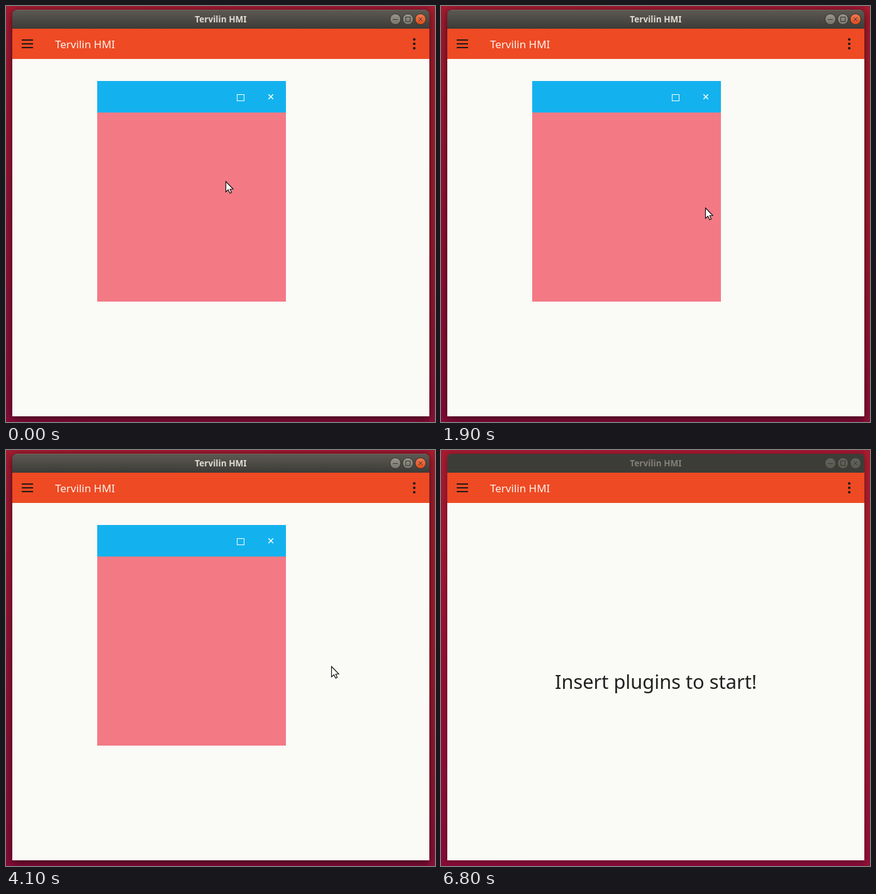
These frames come from a looping animation (682x660 px, 6900 ms). An HTML page with a canvas:

```html
<!DOCTYPE html>
<html lang="en">
<head>
<meta charset="utf-8">
<title>Context menu demo</title>
<style>
  html, body { margin: 0; width: 100%; height: 100%; overflow: hidden; background: #8a1030; }
  canvas { display: block; }
</style>
</head>
<body>
<canvas id="stage" width="682" height="660"></canvas>
<script>
const ctx = document.getElementById('stage').getContext('2d');
const LOOP = 6900, STEP = 100;
const APP_NAME = 'Tervilin HMI';
const BLUE = '#13b2ee', PINK = '#f37a85', ORANGE = '#ee4a24', PAPER = '#fafaf6';
const INK = '#212121', ICON = '#1f1a18';

// Pointer glides; it rests in between
const HOME = { x: 349, y: 278 };
const GLIDES = [
  { from: 0, to: 600, x: 334, y: 287, loop: true },
  { from: 900, to: 1400, x: 420, y: 320 },
  { from: 2100, to: 2200, x: 334, y: 291 },
  { from: 2400, to: 2500, x: 369, y: 305 },
  { from: 2500, to: 3000, x: 388, y: 380 },
  { from: 3300, to: 3800, x: 517, y: 343 },
  { from: 4200, to: 4500, x: 351, y: 353 },
  { from: 4600, to: 5300, x: 454, y: 482 },
  { from: 5600, to: 5800, x: 569, y: 281 },
  { from: 5900, to: 6500, x: 654, y: 51 }
];
const POINTER_END = 6700;

// Each menu opens where the pointer clicked
const MENUS = [{ click: 800, close: 1720 }, { click: 2400, close: 3220 }, { click: 4500, close: 5300 }];
const MENU_ITEMS = ['Custom option', 'Settings (from origin…', 'Close'];
const MENU_WIDTH = 200, ROW = 48, PAD = 8;
const DIALOG = { open: 3220, close: 3870 };
const PLUGIN_END = 5400;

const clamp = u => Math.min(Math.max(u, 0), 1);
const easeOut = (u, power) => 1 - (1 - clamp(u)) ** power;
const fade = ms => easeOut(ms / 150, 3);
const grow = ms => easeOut(ms / 220, 5);

function pointerAt(t) {
  let { x, y } = HOME;
  for (const glide of GLIDES) {
    const k = clamp((t - glide.from) / (glide.to - glide.from));
    x += (glide.x - x) * k;
    y += (glide.y - y) * k;
    if (glide.loop) {
      const angle = 2 * Math.PI * k;
      x += 30 * Math.sin(angle) - 33 * (1 - Math.cos(angle));
      y += 43 * (1 - Math.cos(angle));
    }
  }
  return { x, y };
}

function rect(x, y, w, h, fill) {
  ctx.fillStyle = fill;
  ctx.fillRect(x, y, w, h);
}

function roundRect(x, y, w, h, radius, fill) {
  ctx.beginPath();
  ctx.roundRect(x, y, w, h, radius);
  ctx.fillStyle = fill;
  ctx.fill();
}

function circle(x, y, r, fill) {
  ctx.beginPath();
  ctx.arc(x, y, r, 0, 7);
  ctx.fillStyle = fill;
  ctx.fill();
}

function poly(points, fill) {
  ctx.beginPath();
  points.forEach(([x, y]) => ctx.lineTo(x, y));
  ctx.closePath();
  ctx.fillStyle = fill;
  ctx.fill();
}

function pen(color, width) {
  ctx.strokeStyle = color;
  ctx.lineWidth = width;
}

function strokeLine(x0, y0, x1, y1) {
  ctx.beginPath();
  ctx.moveTo(x0, y0);
  ctx.lineTo(x1, y1);
  ctx.stroke();
}

function cross(x, y, r) {
  strokeLine(x - r, y - r, x + r, y + r);
  strokeLine(x - r, y + r, x + r, y - r);
}

function text(str, x, y, size, color = INK, weight = 400, align = 'left') {
  ctx.font = `${weight} ${size}px "Noto Sans", "Open Sans", sans-serif`;
  ctx.textAlign = align;
  ctx.fillStyle = color;
  ctx.fillText(str, x, y);
}

function withShadow(dy, blur, alpha, draw) {
  ctx.save();
  ctx.shadowColor = `rgba(0,0,0,${alpha})`;
  ctx.shadowOffsetY = dy;
  ctx.shadowBlur = blur;
  draw();
  ctx.restore();
}

function gradient(x0, y0, x1, y1, ...colors) {
  const g = ctx.createLinearGradient(x0, y0, x1, y1);
  colors.forEach((c, i) => g.addColorStop(i / (colors.length - 1), c));
  return g;
}

function popup(originX, originY, scale, alpha, draw) {
  ctx.save();
  ctx.globalAlpha = alpha;
  ctx.translate(originX, originY);
  ctx.scale(scale, scale);
  ctx.translate(-originX, -originY);
  draw();
  ctx.restore();
}

function drawTitleBar(active) {
  const fill = active ? gradient(0, 6, 0, 36, '#5c5a52', '#3c3b37') : '#3d3d37';
  roundRect(10, 6, 663, 31, [7, 7, 0, 0], fill);
  if (active) rect(16, 6, 651, 1, '#6d6b62');
  text(APP_NAME, 341.5, 25.5, 13.6, active ? '#dfdbd2' : '#817f78', 700, 'center');
  for (let i = 0; i < 3; i++) {
    const x = 619 + 20 * i;
    const colors = !active ? ['#63625a', '#5b5a52'] : i === 2 ? ['#f37a50', '#dc4a1c'] : ['#97958b', '#77756c'];
    circle(x, 21, 9, active ? '#33322e' : '#3a3934');
    circle(x, 21, 8, gradient(0, 13, 0, 29, ...colors));
    pen('#393833', 1);
    if (i === 0) strokeLine(x - 4, 21.5, x + 4, 21.5);
    if (i === 1) ctx.strokeRect(x - 3.5, 17.5, 7, 7);
    if (i === 2) cross(x, 21, 3);
  }
}

function drawWindow(inactive) {
  rect(0, 0, 682, 660, gradient(0, 0, 90, 660, '#a41b30', '#930f34', '#850b37'));
  rect(673, 0, 9, 660, gradient(0, 0, 0, 660, '#a51d2c', '#a01b2d', '#8b1036'));
  withShadow(3 - 2 * inactive, 14 - 6 * inactive, 0.6 - 0.3 * inactive,
    () => roundRect(10, 6, 663, 645, [7, 7, 0, 0], '#3c3b37'));
  drawTitleBar(true);
  ctx.globalAlpha = inactive;
  drawTitleBar(false);
  ctx.globalAlpha = 1;

  rect(10, 36, 663, 48, ORANGE);
  rect(10, 84, 663, 567, PAPER);
  for (let i = -1; i <= 1; i++) {
    rect(25, 59 + 6 * i, 18, 2, ICON);
    circle(649, 60 + 7 * i, 2.1, ICON);
  }
  text(APP_NAME, 78, 67, 17, '#fff4ee');
}

function drawPlugin() {
  rect(145, 119, 300, 50, BLUE);
  rect(145, 169, 300, 300, PINK);
  pen('#fff', 1);
  ctx.strokeRect(367.5, 140.5, 11, 10);
  pen('#fff', 1.5);
  cross(421, 144, 3.7);
}

function drawMenu({ click, close }, t) {
  const closing = t - close;
  if (t <= click || closing >= 150) return;
  const { x, y } = pointerAt(click);
  const shown = 1 - fade(closing);
  popup(x + MENU_WIDTH, y, 1 - 0.1 * grow(closing), shown, () => {
    withShadow(4, 13, 0.4 * shown, () => roundRect(x, y, MENU_WIDTH, 160, 3, '#fffffc'));
    // Hover trails the pointer by one step
    const pointer = pointerAt(t - STEP);
    MENU_ITEMS.forEach((label, i) => {
      const top = y + PAD + ROW * i;
      const hovered = pointer.x >= x && pointer.y >= top && pointer.y < top + ROW;
      if (hovered && closing < 0) rect(x, top, MENU_WIDTH, ROW, '#eeeeeb');
      text(label, x + 16, top + 29, 15.5);
    });
  });
}

function drawSwitch(label, y, focused) {
  roundRect(260, y - 6.5, 35, 14, 7, '#89d5f5');
  if (focused) circle(287.5, y, 18.5, 'rgba(30,80,80,.12)');
  withShadow(1, 4, 0.35, () => circle(287.5, y, 10, BLUE));
  text(label, 305.5, y + 5.5, 13.8);
}

function drawSpinBox(label, value, y) {
  pen('#8b8b8b', 1);
  ctx.strokeRect(252.5, y - 20.5, 69, 40);
  text(value, 299.5, y + 5.5, 14.2, '#111', 400, 'right');
  for (const dir of [-1, 1])
    poly([[306.5, y + 7 * dir], [314.5, y + 7 * dir], [310.5, y + 11 * dir]], '#686868');
  text(label, 338, y + 5.5, 13.8);
}

function drawSpinGroup(title, y, fields) {
  text(title, 252, y + 5, 13.8, INK, 500);
  Object.entries(fields).forEach(([label, value], i) => drawSpinBox(label, value, y + 34.5 + 45 * i));
}

function drawDialog(t) {
  const opening = t - DIALOG.open, closing = t - DIALOG.close;
  if (opening <= 0 || closing >= 150) return;
  const shown = fade(opening) - fade(closing);
  const scale = 0.9 + 0.1 * (grow(opening) - grow(closing));
  popup(341.5, 367.5, scale, shown, () => {
    withShadow(10, 46, 0.38 * shown, () => roundRect(228, 95, 227, 545, 2, '#fffffd'));
    rect(228, 95, 227, 44, '#fffffd');
    text('settings', 256, 134.5, 15.3, '#2a2a2a', 700);
    ['Show title bar', 'Show close button', 'Show dock button', 'Resizable']
      .forEach((label, i) => drawSwitch(label, 183 + 48 * i, i === 1));
    drawSpinGroup('Position', 360, { X: 135, Y: 35, Z: 0 });
    drawSpinGroup('Size', 517, { Width: 300, Height: 350 });
  });
}

function drawPointer(t) {
  const { x, y } = pointerAt(t);
  ctx.save();
  ctx.translate(Math.round(x) + 0.5, Math.round(y) + 0.5);
  poly([[0, 0], [0, 16.5], [3.8, 13], [6.5, 18.5], [9, 17.5], [6.7, 12], [11.5, 11.8]], '#fff');
  pen('#111', 1.2);
  ctx.stroke();
  ctx.restore();
}

function render(t) {
  drawWindow(clamp((t - POINTER_END + STEP) / (2 * STEP)));
  if (t < PLUGIN_END) drawPlugin();
  else text('Insert plugins to start!', 341.5, 379, 30.8, INK, 400, 'center');
  MENUS.forEach(menu => drawMenu(menu, t));
  drawDialog(t);
  if (t < POINTER_END) drawPointer(t);
}

const start = performance.now();
function tick() {
  const t = (performance.now() - start) % LOOP;
  render(Math.floor(t / STEP) * STEP);
  requestAnimationFrame(tick);
}
tick();
</script>
</body>
</html>
```
